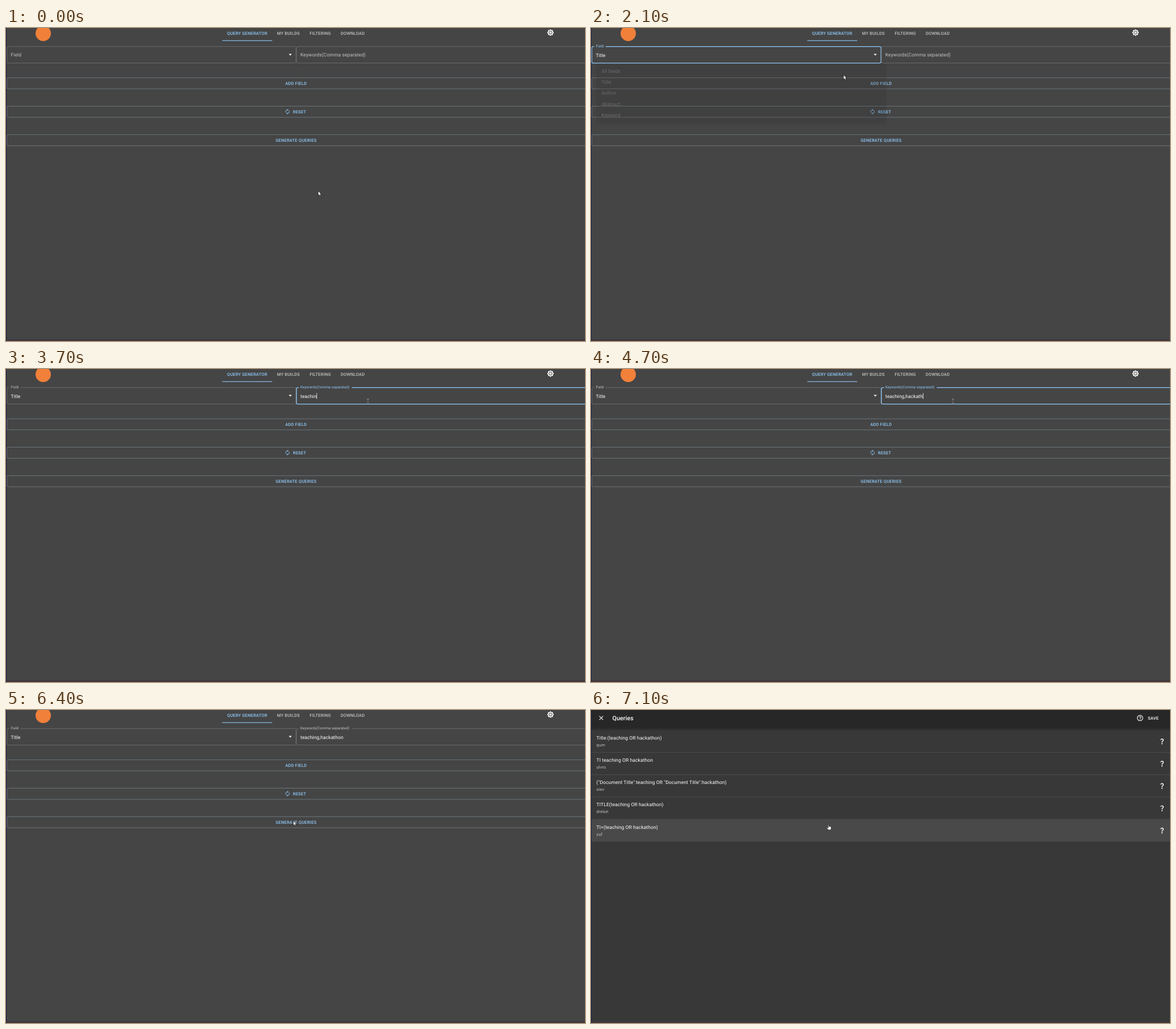
An HTML page that plays this animation: 1019 by 550 pixels, repeating every 8 s.

```html
<!DOCTYPE html>
<html lang="en">
<head>
<meta charset="utf-8">
<title>Query generator</title>
<style>
  html, body { margin: 0; width: 100%; height: 100%; overflow: hidden; background: #454545; }
  svg { display: block; width: 100%; height: 100%; }
  text { font: 400 8.56px Roboto, sans-serif; letter-spacing: .00938em; fill: #fff; white-space: pre; text-rendering: geometricPrecision; }
  .btn { font-size: 7.49px; font-weight: 500; letter-spacing: .02857em; }
  .head { font-size: 10.7px; font-weight: 500; letter-spacing: .0075em; }
  .sub { font-size: 7.49px; letter-spacing: .01071em; fill: #c0c0c0; }
  .blue { fill: #90caf9; }
  .grey { fill: #c4c4c4; }
  #menu { filter: drop-shadow(0 2px 2px rgba(0, 0, 0, .35)); }
</style>
</head>
<body>
<svg id="stage" viewBox="0 0 1019 550"></svg>
<script>
const LOOP = 8000, STEP = 100;
const PAGE = '#454545', BLUE = '#90caf9', GREY = '#c4c4c4', LINE = '#707070', EDGE = '#6f7a82';

const ICONS = {
  sun: 'M20 8.69V4h-4.69L12 .69 8.69 4H4v4.69L.69 12 4 15.31V20h4.69L12 23.31 15.31 20H20v-4.69L23.31 12 20 8.69zM12 18c-3.31 0-6-2.69-6-6s2.69-6 6-6 6 2.69 6 6-2.69 6-6 6zm0-10c-2.21 0-4 1.79-4 4s1.79 4 4 4 4-1.79 4-4-1.79-4-4-4z',
  renew: 'M12 6v3l4-4-4-4v3c-4.42 0-8 3.58-8 8 0 1.57.46 3.03 1.24 4.26L6.7 14.8c-.45-.83-.7-1.79-.7-2.8 0-3.31 2.69-6 6-6zm6.76 1.74L17.3 9.2c.44.84.7 1.79.7 2.8 0 3.31-2.69 6-6 6v-3l-4 4 4 4v-3c4.42 0 8-3.58 8-8 0-1.57-.46-3.03-1.24-4.26z',
  close: 'M19 6.41L17.59 5 12 10.59 6.41 5 5 6.41 10.59 12 5 17.59 6.41 19 12 13.41 17.59 19 19 17.59 13.41 12z',
  help: 'M11 18h2v-2h-2v2zm1-16C6.48 2 2 6.48 2 12s4.48 10 10 10 10-4.48 10-10S17.52 2 12 2zm0 18c-4.41 0-8-3.59-8-8s3.59-8 8-8 8 3.59 8 8-3.59 8-8 8zm0-14c-2.21 0-4 1.79-4 4h2c0-1.1.9-2 2-2s2 .9 2 2c0 2-3 1.75-3 5h2c0-2.25 3-2.5 3-5 0-2.21-1.79-4-4-4z',
  ask: 'M11.07 12.85c.77-1.39 2.25-2.21 3.11-3.44.91-1.29.4-3.7-2.18-3.7-1.69 0-2.52 1.28-2.87 2.34L6.54 6.96C7.25 4.83 9.18 3 11.99 3c2.35 0 3.96 1.07 4.78 2.41.7 1.15 1.11 3.3.03 4.9-1.2 1.77-2.35 2.31-2.97 3.45-.25.46-.35.76-.35 2.24h-2.89c-.01-.78-.13-2.05.48-3.15zM14 20c0 1.1-.9 2-2 2s-2-.9-2-2 .9-2 2-2 2 .9 2 2z'
};
const QUERIES = [
  ['Title:(teaching OR hackathon)', 'qum'],
  ['TI teaching OR hackathon', 'ulvro'],
  ['("Document Title":teaching OR "Document Title":hackathon)', 'oiev'],
  ['TITLE(teaching OR hackathon)', 'drelun'],
  ['TI=(teaching OR hackathon)', 'zuf']
];
const OPTIONS = ['All fields', 'Title', 'Author', 'Abstract', 'Keyword'];
const TYPED = 'teaching,hackathon';

// Pointer stops: time, x, y
const PATH = [
  [0, 549.3, 286], [100, 549.3, 286], [300, 384.5, 72.5], [500, 384.5, 72.5],
  [800, 345, 49.5], [1100, 345, 49.5], [1700, 340, 95], [1900, 340, 95],
  [2400, 636, 58], [2900, 636, 58], [3000, 637, 57], [5300, 637, 57],
  [6200, 505.6, 194.3], [6900, 505.6, 194.3], [7100, 418, 201], [LOOP, 418, 201]
];

const text = (x, y, s, cls = '', id = '') => `<text x="${x}" y="${y}" class="${cls}" id="${id}">${s}</text>`;
const rect = (x, y, w, h, fill, more = '') => `<rect x="${x}" y="${y}" width="${w}" height="${h}" fill="${fill}" ${more}/>`;
const icon = (name, cx, cy, size = 12.84, fill = '#fff') =>
  `<path d="${ICONS[name]}" fill="${fill}" transform="translate(${cx - size / 2} ${cy - size / 2}) scale(${size / 24})"/>`;
const button = (y, x, s, id) =>
  rect(1.3, y + .4, 1020, 19.5, BLUE, `id="${id}" rx="2.1" fill-opacity="0" stroke="${EDGE}" stroke-width=".9"`) + text(x, y + 12.7, s, 'btn blue');

const rowY = i => 36 + 39.15 * i;
const queryRow = ([query, base], i) => {
  const y = rowY(i);
  return text(9.6, y + 16, query) + text(9.6, y + 28, base, 'sub') + icon('ask', 1005, y + 19) +
    (i < 4 ? rect(1, y + 38.2, 1018, .8, '#525252') : '');
};

const BEAM = 'M-2-4Q0-4 0-3V3Q0 4-2 4M2-4Q0-4 0-3V3Q0 4 2 4';

document.getElementById('stage').innerHTML = `
  <defs><linearGradient id="shade" x2="0" y2="1"><stop stop-opacity=".28"/><stop offset="1" stop-opacity="0"/></linearGradient></defs>
  ${rect(0, 0, 1019, 550, PAGE)}
  <circle cx="65.5" cy="9.5" r="13.5" fill="#f0803a"/>
  ${text(389, 11.7, 'QUERY GENERATOR', 'btn blue')}
  ${text(477, 11.7, 'MY BUILDS', 'btn grey')}
  ${text(534.4, 11.7, 'FILTERING', 'btn grey')}
  ${text(588.9, 11.7, 'DOWNLOAD', 'btn grey')}
  ${rect(380.7, 21.6, 87.8, 1.1, BLUE)}
  ${icon('sun', 958.3, 8)}
  <path id="boxA" fill="none"/><path id="boxB" fill="none"/>
  ${text(8.5, 50, 'Field', '', 'labelA')}
  ${text(518, 50, 'Keywords(Comma separated)', '', 'labelB')}
  ${text(8.5, 50.5, 'Title', '', 'valueA')}
  ${text(518, 50.5, '', '', 'valueB')}
  ${rect(518, 42.3, .8, 10.3, '#fff', 'id="caret"')}
  <path id="arrow" d="M-2.7-1.4h5.4L0 1.4z" fill="#fff"/>
  ${button(87, 491.4, 'ADD FIELD', 'btn0')}
  ${button(137, 505, 'RESET', 'btn1')}
  ${button(187, 474.4, 'GENERATE QUERIES', 'btn2')}
  ${icon('renew', 495.4, 147, 10.7, BLUE)}
  <g id="menu">
    ${rect(9.7, 62.3, 509.3, 104.6, '#2f2f2f', 'rx="2"')}
    ${rect(9.7, 85.5, 509.3, 19.26, '#404040', 'id="hover"')}
    ${OPTIONS.map((s, i) => text(18.4, 78.9 + 19.26 * i, s)).join('')}
  </g>
  ${rect(0, 0, 1019, 550, '#000', 'id="dim"')}
  <g id="dialog">
    ${rect(1, -2.5, 1018, 560, '#383838')}
    ${rect(1, rowY(4), 1018, 38.6, '#494949', 'id="rowHover"')}
    ${rect(1, 31.7, 1018, 5, 'url(#shade)')}
    ${rect(1, -2.5, 1018, 34.2, '#272727')}
    ${icon('close', 18, 14)}
    ${text(37.5, 17.8, 'Queries', 'head')}
    ${icon('help', 966.3, 14)}
    ${text(980, 16.7, 'SAVE', 'btn')}
    ${QUERIES.map(queryRow).join('')}
  </g>
  ${rect(0, 0, 1, 550, '#141b40')}
  ${rect(1, 547, 1018, 3, '#41373c')}
  <g id="pointer">
    <path id="point" d="M0 0V8.6L2 6.9 3.3 9.8 4.8 9.1 3.6 6.3H6Z" fill="#fff" stroke="#111" stroke-width=".8"/>
    <path id="hand" d="M-1.3.6Q-1.1-.3-.3.1L.8 3.6 2.1 3.3 3.2 3.8 4.5 4.3Q5.4 5.6 4.6 7.4L4.1 9.8H-.2L-3.5 6Q-3.6 4.8-2.4 5.3L-.5 6.4Z" fill="#fff" stroke="#111" stroke-width=".7"/>
    <g id="beam" fill="none"><path d="${BEAM}" stroke="#ccc" stroke-width="1.3"/><path d="${BEAM}" stroke="#222" stroke-width=".6"/></g>
  </g>`;

const el = {};
document.querySelectorAll('[id]').forEach(n => { if (n.id) el[n.id] = n; });
const set = (id, attrs) => { for (const k in attrs) el[id].setAttribute(k, attrs[k]); };
const show = (id, on) => set(id, { visibility: on ? 'inherit' : 'hidden' });
const clamp = (v, lo = 0, hi = 1) => Math.min(hi, Math.max(lo, v));
const mix = (a, b, p) => a + (b - a) * p;
const within = (t, a, b) => t >= a && t < b;

function pointerAt(t) {
  const i = PATH.findIndex(k => k[0] > t);
  const [a, b] = [PATH[i - 1], PATH[i]];
  const u = (t - a[0]) / (b[0] - a[0]), p = u * u * (3 - 2 * u);
  return [mix(a[1], b[1], p), mix(a[2], b[2], p)];
}

function typedCount(t) {
  if (t < 3900) return clamp((t - 3000) / 100, 0, 7);
  if (t < 4200) return 9;
  if (t < 5000) return Math.min(17, 10 + (t - 4200) / 100 + (t >= 4500));
  return 18;
}

// Outlined field whose top edge opens for a raised label
function field(id, x, right, gap, p, focus, hover) {
  const [a, b] = p > 0 ? gap : [x + 9, x + 9], r = 2.1, top = 32.6, bottom = 61.6;
  set('box' + id, {
    d: `M${b} ${top}H${right - r}q${r} 0 ${r} ${r}V${bottom - r}q0 ${r} ${-r} ${r}H${x + r}q${-r} 0 ${-r} ${-r}V${top + r}q0 ${-r} ${r} ${-r}H${a}`,
    stroke: focus ? BLUE : hover ? '#fff' : LINE,
    'stroke-width': focus ? 1.3 : .9
  });
  set('label' + id, { y: mix(50, 34.3, p) });
  el['label' + id].style.fontSize = mix(8.56, 6.42, p) + 'px';
  el['label' + id].style.fill = focus ? BLUE : GREY;
}

function draw(t) {
  const [x, y] = pointerAt(t);
  const inFields = within(y, 32, 62);
  const free = !within(t, 1000, 2200) && t < 6400;
  const overA = free && inFields && x < 510, overB = free && inFields && x >= 511;

  field('A', 1.4, 510.3, [5.5, 25.5], clamp((t - 930) / 140), within(t, 1000, 2900), overA);
  field('B', 511.1, 1021, [515.6, 608.6], clamp((t - 2830) / 100), within(t, 2900, 6300), overB);
  show('valueA', t >= 2000);
  const open = within(t, 1000, 2000);
  set('arrow', { transform: `translate(500.3 47) scale(1 ${open ? -1 : 1})` });

  const n = typedCount(t);
  el.valueB.textContent = TYPED.slice(0, n);
  set('caret', { x: 518 + (n ? el.valueB.getComputedTextLength() : .2) });
  show('caret', within(t, 2900, 5500) || within(t, 6000, 6300));

  let overButton = false;
  for (let i = 0; i < 3; i++) {
    const on = free && within(y, 87 + 50 * i, 107 + 50 * i);
    overButton = overButton || on;
    set('btn' + i, { 'fill-opacity': on ? .08 : 0, stroke: on ? BLUE : EDGE });
  }

  const fade = t < 2000 ? clamp((t - 900) / 215) : clamp(1 - (t - 1900) / 250);
  set('menu', { opacity: fade });
  show('menu', fade > 0 && within(t, 1000, 2200));
  const overItem = within(t, 1200, 2100) && within(y, 85.5, 104.8);
  show('hover', overItem);

  const slide = clamp((t - 6417) / 225);
  set('dim', { opacity: clamp(slide * .7, 0, .5) });
  show('dialog', slide > 0);
  set('dialog', { transform: `translate(0 ${552 * (1 - slide) ** 2.8})` });
  show('rowHover', t >= 6700);

  const hand = overA || overButton || overItem || t >= 6700;
  set('pointer', { transform: `translate(${x} ${y})` });
  show('hand', hand);
  show('beam', overB && !hand);
  show('point', !hand && !overB);
}

const start = performance.now();
function tick() {
  const t = (performance.now() - start) % LOOP;
  draw(Math.floor(t / STEP) * STEP);
  requestAnimationFrame(tick);
}
tick();
</script>
</body>
</html>
```
